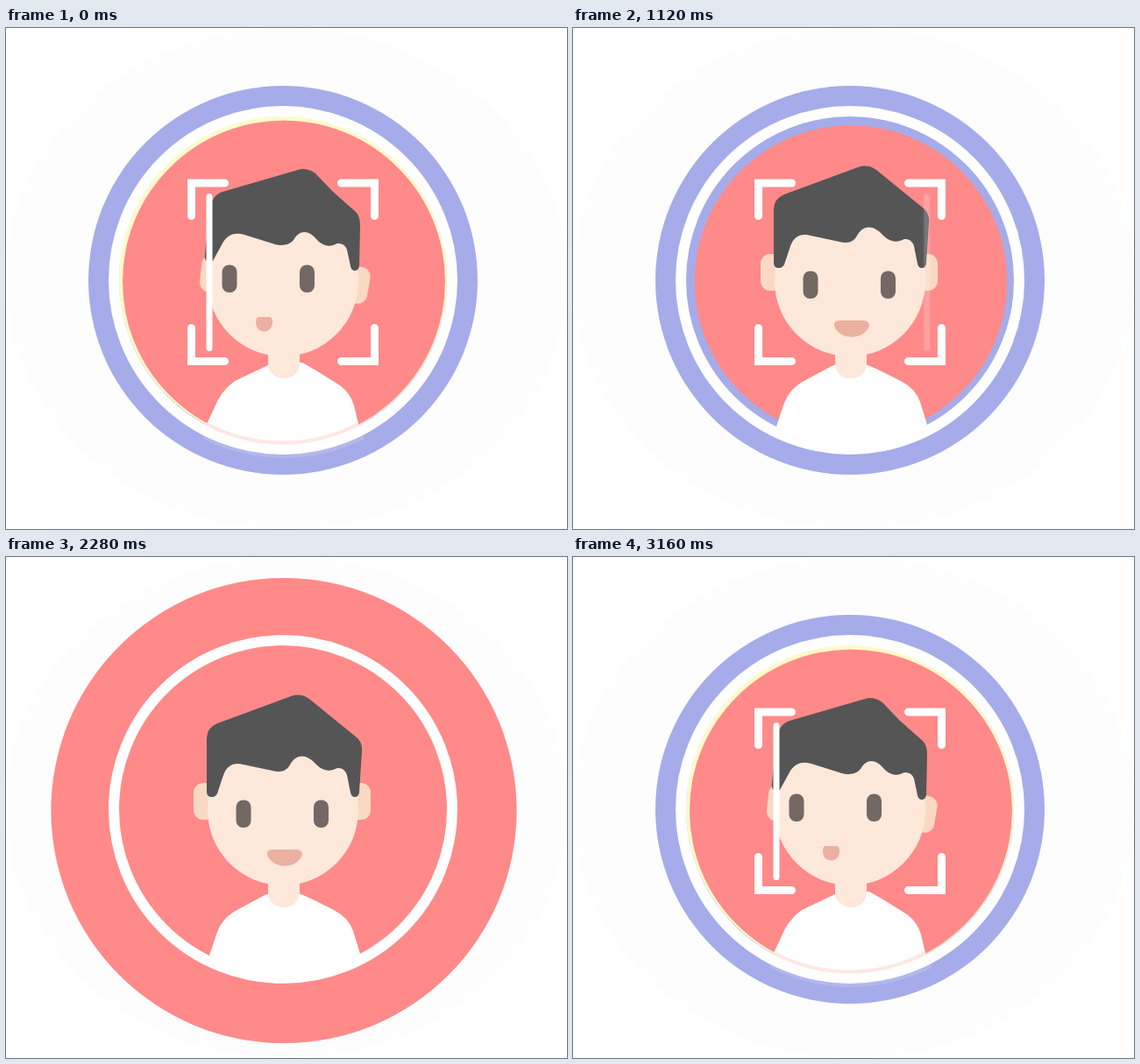
An HTML page that plays this animation: 640 px wide and 572 px high, repeating every 3.2 s.

```html
<!DOCTYPE html>
<html lang="en">
<head>
<meta charset="utf-8">
<title>Face scan</title>
<style>
html, body { margin: 0; width: 100%; height: 100%; overflow: hidden; background: #fff; }
svg { display: block; width: 100vw; height: 100vh; }
svg * { animation: 3.2s linear infinite; }

/* discs */
.blue { fill: #a5ace9; transform-origin: 316px 288px; animation-name: blue; }
@keyframes blue {
  0%, 52% { opacity: 1; transform: none; }
  52.01%, 87.5% { opacity: 0; transform: scale(1.26); animation-timing-function: ease-out; }
  98.75%, 100% { opacity: 1; transform: none; }
}
.yellow { fill: #fffac9; animation-name: yellow; }
@keyframes yellow {
  0%, 25% { opacity: 1; }
  33%, 60% { opacity: 0; }
  60.01%, 100% { opacity: 1; }
}
.coral { fill: #ff8a89; animation-name: coral; }
@keyframes coral {
  0%, 31.25% { r: 184px; animation-timing-function: cubic-bezier(.36, 0, .66, -.56); }
  51.25%, 70% { r: 330px; }
  71.25% { r: 266.5px; animation-timing-function: ease-out; }
  77.5% { r: 160px; animation-timing-function: ease-in-out; }
  83.75% { r: 162px; animation-timing-function: ease-in-out; }
  96%, 100% { r: 184px; }
}

/* person */
.skin { fill: #fee8da; }
.ear { fill: #fad9c3; transform-box: fill-box; transform-origin: center; }
.ear.l { animation-name: earL; }
.ear.r { animation-name: earR; }
@keyframes earL {
  0%, 2%, 98.75%, 100% { transform: translate(8px, 2px) rotate(6deg); animation-timing-function: ease-in-out; }
  17.5%, 23.5% { transform: translate(1px, 4px); animation-timing-function: ease-in-out; }
  33%, 85% { transform: none; animation-timing-function: ease-in-out; }
}
@keyframes earR {
  0%, 2%, 98.75%, 100% { transform: translate(-2px, 14px) rotate(10deg); animation-timing-function: ease-in-out; }
  17.5%, 23.5% { transform: translate(-2px, 4px); animation-timing-function: ease-in-out; }
  33%, 85% { transform: none; animation-timing-function: ease-in-out; }
}
.eyes { fill: #736863; animation-name: eyes; }
@keyframes eyes {
  0%, 2%, 98.75%, 100% { transform: translate(-16px, -7px); animation-timing-function: ease-in-out; }
  17.5%, 23.5% { transform: translate(7.5px, -1px); animation-timing-function: ease-in-out; }
  33%, 85% { transform: none; animation-timing-function: ease-in-out; }
}
.hair { fill: #555; animation-name: hair; }
@keyframes hair {
  0%, 2%, 98.75%, 100% {
    d: path("M232 210Q234 191 247 187L333 162Q343 159 353 166L372 186L399 210Q404 215 404 226L403 272Q402 277 398 277Q394 277 393 272L389 253Q386 245 378 246C370 250 363 250 355 242C345 230 335 230 328 242C323 248 315 249 307 247L272 236C262 233 254 235 248 244L237 264Q235 268 231 267Q226 266 227 258Z");
    animation-timing-function: ease-in-out;
  }
  17.5%, 85% {
    d: path("M229 207Q229 195 241 190L325 159Q336 155 346 162L373 184L400 206Q407 212 406 222L403 269Q402 274 398 274Q394 274 393 269L389 249Q386 240 378 241C370 245 362 245 354 237C343 225 332 224 324 237C320 245 313 246 304 244L271 237C260 234 252 238 248 249L241 270Q239 274 235 274Q229 274 229 268Z");
    animation-timing-function: ease-in-out;
  }
}
.mouth { fill: #ebb0a0; animation-name: mouth; }
@keyframes mouth {
  0%, 2%, 98.75%, 100% {
    d: path("M288 330L301 330Q304 330 304 336C304 350 285 350 285 336Q285 330 288 330Z");
    animation-timing-function: ease-in-out;
  }
  17.5%, 85% {
    d: path("M304 334L331 334Q338 334 338 340C332 357 304 357 298 340Q297 334 304 334Z");
    animation-timing-function: ease-in-out;
  }
}
.body { fill: #fff; animation-name: body; }
@keyframes body {
  0%, 2%, 98.75%, 100% {
    d: path("M229 452L237 435Q245 414 261 403L299 385Q317 380 338 382L352 390L381 408Q393 417 397 431L402 452Q316 508 229 452Z");
    animation-timing-function: ease-in-out;
  }
  17.5%, 85% {
    d: path("M232 455L241 428Q246 414 260 405L295 386Q317 378 339 386L352 392L374 403Q391 412 396 427L404 453Q318 507 232 455Z");
    animation-timing-function: ease-in-out;
  }
}
.hem { fill: none; animation-name: hem; }
@keyframes hem {
  0%, 98.75%, 100% { opacity: 1; }
  14%, 88% { opacity: 0; }
}

/* scanner */
.frame { fill: none; stroke: #fff; stroke-width: 9; stroke-linecap: round; transform-origin: 316px 278.5px; animation-name: frame; }
@keyframes frame {
  0%, 35% { opacity: 1; transform: none; }
  43%, 82.5% { opacity: 0; transform: scale(.9); }
  83.75% { opacity: .1; transform: scale(.91); animation-timing-function: ease-out; }
  95%, 100% { opacity: 1; transform: none; }
}
.scan { transform-origin: 316px 279px; animation-name: scan; }
@keyframes scan {
  0%, 27.5% { opacity: 1; transform: none; }
  35% { opacity: .2; transform: none; }
  37%, 82.5% { opacity: 0; transform: scale(.77); }
  83.75% { opacity: .08; transform: scale(.79); animation-timing-function: ease-out; }
  95%, 100% { opacity: 1; transform: none; }
}
.sweep { animation-name: sweep; }
@keyframes sweep {
  0% { transform: none; animation-timing-function: ease-in-out; }
  18.75%, 60% { transform: translateX(172px); }
  60.01%, 100% { transform: none; }
}
.bar { stroke: #fff; stroke-width: 7; stroke-linecap: round; }
.trail { fill: #98a5fa; fill-opacity: .47; transform-origin: 229px 0; animation-name: trail; }
@keyframes trail {
  0%, 1% { transform: scaleX(0); }
  11%, 16% { transform: scaleX(1); }
  22.5% { transform: scaleX(.48); }
  26%, 100% { transform: scaleX(0); }
}

/* confetti: --x/--y offset from centre, --a early and --b late reach */
.bit { --a: .97; --b: 1.01; animation-name: bit; }
.bit.far { --a: .88; --b: 1.13; }
@keyframes bit {
  0%, 8% { opacity: 0; transform: translate(calc(var(--x) * .76px), calc(var(--y) * .76px)) scale(0); animation-timing-function: ease-out; }
  17.5% { opacity: 1; transform: translate(calc(var(--x) * var(--a) * 1px), calc(var(--y) * var(--a) * 1px)) scale(.9); }
  22.5% { opacity: 1; transform: translate(calc(var(--x) * 1px), calc(var(--y) * 1px)); }
  31%, 100% { opacity: 0; transform: translate(calc(var(--x) * var(--b) * 1px), calc(var(--y) * var(--b) * 1px)); }
}
</style>
</head>
<body>
<svg viewBox="0 0 640 572" preserveAspectRatio="none">
  <defs>
    <clipPath id="stage"><ellipse cx="320" cy="286" rx="320" ry="286"/></clipPath>
    <path id="star" d="M0-1L.25-.36L.95-.31L.42.13L.58.8L0 .45L-.58.8L-.42.13L-.95-.31L-.25-.36Z"/>
  </defs>

  <ellipse cx="320" cy="286" rx="320" ry="286" fill="#fdfdfd"/>
  <circle class="blue" cx="316" cy="288" r="222"/>
  <circle class="yellow" cx="316" cy="287.5" r="187"/>
  <g clip-path="url(#stage)"><circle class="coral" cx="317" cy="289.5" r="184"/></g>
  <circle cx="316" cy="288" r="193" fill="none" stroke="#fff" stroke-width="12"/>

  <path class="body"/>
  <g class="hem">
    <path d="M229 452A184 184 0 0 0 402 452" stroke="#ffe7e4" stroke-width="4"/>
    <path d="M226 466A200 200 0 0 0 408 466" stroke="#fff" stroke-opacity=".15" stroke-width="6"/>
  </g>
  <rect class="skin" x="299" y="350" width="36" height="50" rx="17"/>
  <rect class="ear l" x="214" y="258" width="32" height="42" rx="11"/>
  <rect class="ear r" x="384" y="258" width="32" height="42" rx="11"/>
  <circle class="skin" cx="316" cy="289" r="86"/>
  <path class="hair"/>
  <g class="eyes">
    <rect x="262.5" y="277.5" width="17" height="31.5" rx="8"/>
    <rect x="351" y="277.5" width="17" height="31.5" rx="8"/>
  </g>
  <path class="mouth"/>

  <path class="frame" d="M211.5 214.5V177H249.5M382.5 177H420.5V214.5M420.5 342.5V380.5H382.5M249.5 380.5H211.5V342.5"/>
  <g class="scan"><g class="sweep">
    <rect class="trail" x="133" y="191" width="96" height="175"/>
    <path class="bar" d="M232 192.5V365.5"/>
  </g></g>

  <g transform="translate(316 288)">
    <path class="bit" style="--x:-132;--y:-234" fill="#fde9e7" d="M-33-12L13-32A34.5 34.5 0 1 1-33-12Z"/>
    <circle class="bit" style="--x:-36;--y:-243" fill="#e8e6fb" r="13"/>
    <g class="bit" style="--x:-219.5;--y:-123"><use href="#star" fill="#ffdd82" transform="scale(38.5)"/></g>
    <circle class="bit" style="--x:-275;--y:28" fill="#ffe6d9" r="10"/>
    <circle class="bit far" style="--x:236;--y:-151" fill="#daf2d6" r="18"/>
    <g class="bit far" style="--x:262;--y:-29"><use href="#star" fill="#e3a591" transform="scale(23.5)"/></g>
    <circle class="bit far" style="--x:232;--y:128;--b:1.07" fill="#f1e8fa" r="30"/>
  </g>
</svg>
</body>
</html>
```
